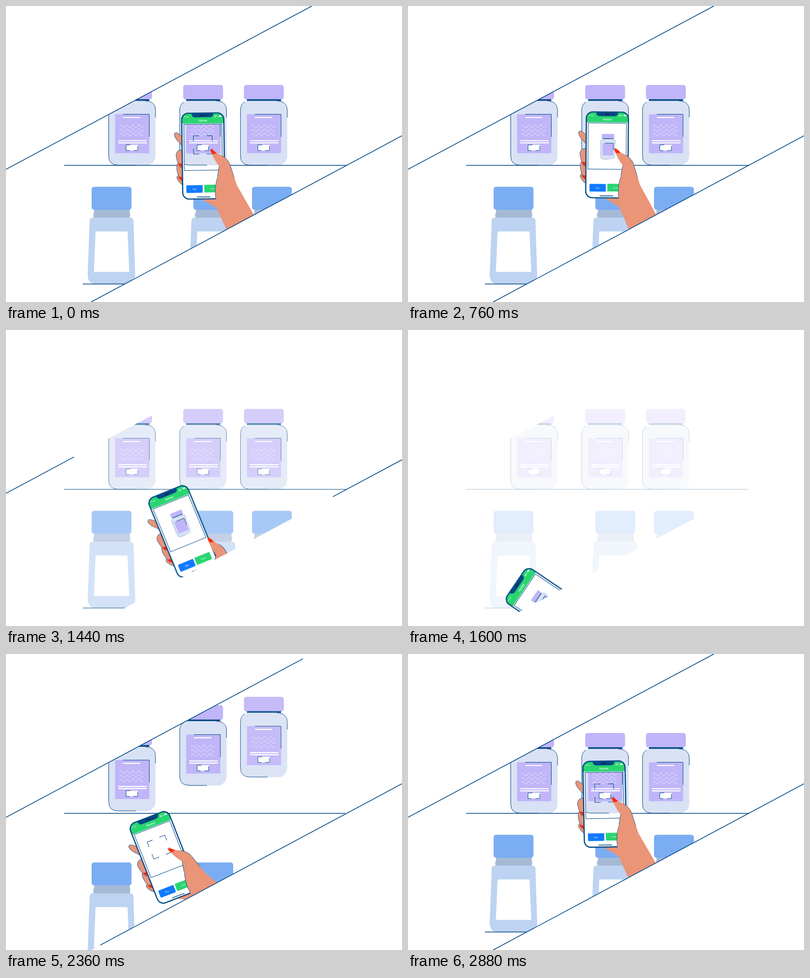
Animation, 800 px wide and 600 px high, one loop 2920 ms. Source, as an HTML page:

```html
<!DOCTYPE html>
<html lang="en">
<head>
<meta charset="utf-8">
<title>Scanning a bottle</title>
<style>
  html, body { margin: 0; width: 100%; height: 100%; overflow: hidden; background: #fff; }
  svg { display: block; width: 100vw; height: 100vh; }
  text { font-family: Inter, Roboto, sans-serif; fill: #fff; text-anchor: middle; }
  .ink { fill: none; stroke: #044a87; }
  .line { stroke-width: 1.5; }
  .skin { fill: #ea9478; }
  .nail { fill: #f92b0c; }
  .edge { stroke: #044a87; stroke-width: .8; }
</style>
</head>
<body>
<svg viewBox="0 0 800 600">
  <defs>
    <clipPath id="band"><path d="M0 331 618 0H800V263L172 600H0z"/></clipPath>
    <clipPath id="finder"><rect x="-38.5" y="-64.5" width="77" height="93.5"/></clipPath>
    <clipPath id="case"><rect x="-42.5" y="-87" width="85" height="174" rx="13"/></clipPath>

    <g id="jar">
      <rect x="7" y="160" width="80.5" height="29.5" rx="5" fill="#bfb5f8"/>
      <rect x="13" y="189" width="69" height="3.5" fill="#044a87"/>
      <rect y="192.5" width="94.5" height="130.5" rx="19" fill="#d9e1f5"/>
      <path class="ink" d="M9 194.5Q0 199 0 211V304Q0 322.5 19 322.5H55M74 192.5Q94.5 193 94.5 212V226"/>
      <rect x="13" y="219.5" width="69" height="79" fill="#bfb5f8"/>
      <path class="ink" d="M29 219.5H82V265"/>
    </g>
    <g id="bottle">
      <use href="#jar"/>
      <path stroke="#fff" stroke-width="2.2" d="M29 226H64M19 273H77M19 277.3H77"/>
      <g id="waves" fill="none" stroke="#e9e5fe"/>
      <rect x="35" y="281.5" width="24" height="11.5" fill="#fff"/>
      <path class="ink" d="M44 281.5H35V293H42M50 293H58.5V284"/>
    </g>

    <g id="flask">
      <rect x="173" y="366.5" width="80.5" height="46.5" rx="5" fill="#7badf3"/>
      <path fill="#a6bad6" d="M178 413H250V418Q252 423 250 428L247 431H180L177 428Q175 423 178 418z"/>
      <path fill="#bdd3f1" d="M175 429H251Q257 429 257.5 436L261 545Q261 563 245 563H181Q165 563 165 545L169 436Q169 429 175 429z"/>
      <path fill="#fff" d="M181 457H245.5L249 539H177.500z"/>
    </g>
  </defs>

  <rect width="800" height="600" fill="#fff"/>
  <g clip-path="url(#band)">
    <g id="goods">
      <g id="jars"></g>
      <path id="shelf" class="ink line"/>
      <g id="flasks">
        <use href="#flask"/><use href="#flask" x="205.5"/><use href="#flask" x="324"/>
        <path class="ink line" d="M155 563.5H300"/>
      </g>
    </g>

    <g id="device">
      <g class="skin">
        <path d="M-10 84 26 106 45 150 72 205 100 150 40 80z"/>
        <path class="edge" d="M-41-20-53-33Q-58-40-58-45Q-56-50-51-47L-41-39z"/>
        <path class="edge" d="M-41 38Q-53 36-54 43Q-52 52-41 60z"/>
        <path class="edge" d="M-41 10Q-54 8-54 24Q-53 38-46 48L-41 50z"/>
        <path class="edge" d="M-41-13Q-54-14-55-2Q-54 10-47 22L-41 24z"/>
      </g>
      <g class="nail">
        <path id="nail" d="M-51 16Q-46 12-42 18L-43 22Q-48 21-51 16z"/>
        <use href="#nail" y="27"/>
      </g>

      <g clip-path="url(#case)">
        <rect x="-43" y="-87" width="86" height="174" fill="#fff"/>
        <rect x="-43" y="-87" width="86" height="21" fill="#29d56f"/>
      </g>
      <g clip-path="url(#finder)">
        <g id="view"><use id="seen" href="#bottle"/></g>
      </g>
      <g id="icon" transform="translate(-13.2 -93) scale(.315)">
        <use href="#jar"/>
        <path class="ink" stroke-width="2.5" d="M13 191H82M29 219.5H82V265"/>
      </g>
      <path id="brackets" class="ink" d="M-19.5-30V-41H-8M7-41H18.5V-30M18.5-15V-4H7M-8-4H-19.5V-15"/>
      <rect class="ink" x="-38.5" y="-64.5" width="77" height="93.5"/>
      <rect x="-35" y="59" width="33" height="15.5" rx="1.5" fill="#117aff"/>
      <rect x="1" y="58.5" width="33" height="15.5" rx="1.5" fill="#29d56f"/>
      <text x="-18.5" y="68.5" font-size="4.2">Buy</text>
      <text x="17.5" y="68" font-size="4.2">Scan</text>
      <text y="-69.8" font-size="6.3" font-weight="500">Home</text>
      <text x="-33" y="-78" font-size="4">15:45</text>
      <path fill="#044a87" d="M-23-87H22Q21-78.5 15-78.5H-16Q-22-78.5-23-87z"/>
      <path stroke="#0b1f3d" stroke-width="1.8" stroke-linecap="round" d="M-5-82.5H4M9-82.5H9.1"/>
      <path stroke="#fff" d="M24-78.5V-80M25.5-78.5V-81M27-78.5V-82M29.5-79.5H31"/>
      <rect x="32.5" y="-81.5" width="5.5" height="2.8" rx="1" fill="#fff"/>
      <rect class="ink" x="-42.5" y="-87" width="85" height="174" rx="13" stroke-width="2.4"/>
      <path class="ink line" d="M-14 83H13"/>

      <g id="grip">
        <path class="skin" d="M24 86Q21 62 29 42L62 45 67 60 99 118 130 172 72 205 45 150 26 106z"/>
        <path class="ink edge" d="M24 86Q21 62 29 42"/>
        <g id="thumb">
          <path class="skin" d="M14-12 38 0Q50 7 54 19L66 58 40 66 28 42 32 21Q22 10 14-12z"/>
          <path class="ink edge" d="M28 42 32 21M38 0Q50 7 54 19L62 45"/>
          <path class="nail" d="M14-14Q22-12 27-5Q22-3 18-4Q15-8 14-14z"/>
        </g>
      </g>
    </g>
  </g>
  <path id="topLine" class="ink line"/>
  <path id="lowLine" class="ink line"/>
</svg>
<script>
const LOOP = 2920, FRAME = 40, RETURN = 1960;
const $ = id => document.getElementById(id);
const set = (node, values) => Object.entries(values).forEach(([k, v]) => node.setAttribute(k, v));
const ramp = (t, from, length) => Math.min(1, Math.max(0, (t - from) / length));
const inOut = p => p < .5 ? 2 * p * p : 1 - 2 * (1 - p) ** 2;
const out = p => 1 - (1 - p) ** 2;

const jars = [
  { x: 207.5, drop: 160, start: 1960 },
  { x: 351, drop: 165, start: 2160 },
  { x: 473.7, drop: 215, start: 2160 }
];

$("waves").innerHTML = [245, 253.5, 262].map(y =>
  `<path d="M22 ${y}q3-7 6-1${"t6 -.1".repeat(7)}"/>`).join("");
$("jars").innerHTML = jars.map(() => '<use href="#bottle"/>').join("");
const jarNodes = [...$("jars").children];

function drawLine(id, x, y, dx, dy, p) {
  $(id).setAttribute("d", p > 0 ? `M${x} ${y}l${dx * p} ${dy * p}` : "");
}

// Drifts while held, swings down out of the band, then swings back up.
function devicePose(t) {
  if (t >= RETURN) {
    const left = 1 - ramp(t, RETURN, LOOP - RETURN);
    return [398.5 - 190 * left ** 1.6, 304 + 374 * left ** 2.3, -.8 - 49.5 * left ** 1.63];
  }
  const drift = ramp(t, 0, 1240), swing = inOut(ramp(t, 1200, 600));
  return [398.5 + 6 * drift - 148 * swing, 304 - 3.5 * drift + 337 * swing, -.8 + 2.1 * drift - 73.5 * swing];
}

function drawGoods(t, back) {
  $("goods").setAttribute("opacity", back ? 1 : 1 - ramp(t, 1316, 364));
  jars.forEach(({ x, drop, start }, i) => {
    const y = back ? -drop * (1 - out(ramp(t, start, 480))) : 0;
    const look = {
      transform: `translate(${x} ${y})`,
      opacity: back ? ramp(t, 2000 + 70 * i, 240) : 1
    };
    set(jarNodes[i], look);
    if (i === 1) set($("seen"), look);
  });
  const sink = back ? 317 * (1 - out(ramp(t, RETURN, 690))) : 0;
  $("flasks").setAttribute("transform", `translate(0 ${sink})`);
}

function drawLines(t, back) {
  const reach = inOut(back ? ramp(t, RETURN, 455) : 1 - ramp(t, 1160, 420));
  drawLine("topLine", 0, 331, 618, -331, reach);
  drawLine("lowLine", 800, 263, -628, 337, reach);
  drawLine("shelf", 117.5, 323, 571, 0, back ? out(ramp(t, RETURN, 434)) : 1);
}

function drawDevice(t, back) {
  const [x, y, angle] = devicePose(t);
  const scanning = back ? 1 : 1 - ramp(t, 240, 200);
  set($("device"), {
    transform: `translate(${x} ${y}) rotate(${angle})`,
    visibility: t >= 1720 && !back ? "hidden" : "visible"
  });
  set($("view"), { transform: `rotate(${-angle}) translate(${-x} ${-y})`, opacity: scanning });
  $("brackets").setAttribute("opacity", scanning);
  $("icon").setAttribute("opacity", back ? 0 : ramp(t, 400, 200));

  const lift = back ? 0 : inOut(ramp(t, 840, 280));
  const letGo = back ? 0 : inOut(ramp(t, 1280, 280));
  $("thumb").setAttribute("transform", `rotate(${23 * lift} 45 50)`);
  $("grip").setAttribute("transform", `translate(0 ${80 * letGo})`);
}

function draw(t) {
  const back = t >= RETURN;
  drawGoods(t, back);
  drawLines(t, back);
  drawDevice(t, back);
}

const start = performance.now();
function tick() {
  const t = (performance.now() - start) % LOOP;
  draw(Math.floor(t / FRAME) * FRAME);
  requestAnimationFrame(tick);
}
tick();
</script>
</body>
</html>
```
